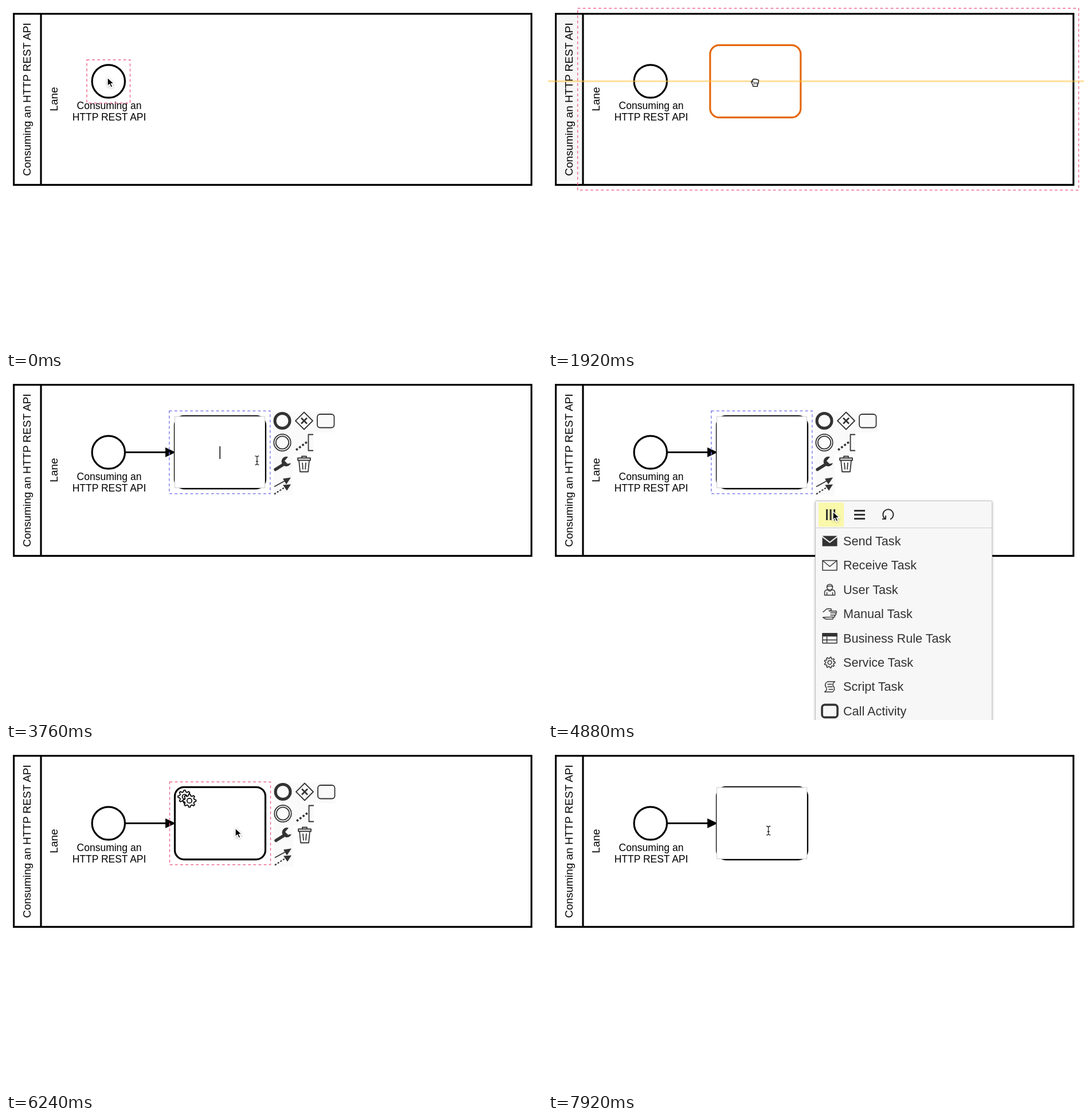
These frames come from a looping animation (935 by 599 pixels, 8 s). An HTML page:

```html
<!DOCTYPE html>
<html lang="en">
<head>
<meta charset="utf-8">
<title>Process modelling</title>
<style>
html, body { margin: 0; width: 100%; height: 100%; overflow: hidden; background: #fff; }
svg { display: block; width: 935px; height: 599px; }
text { font-family: "Liberation Sans", Arial, sans-serif; }
.ln { fill: none; stroke: #000; stroke-width: 3.2; }
.box { fill: none; stroke-width: 1.5; stroke-dasharray: 4.8 4.3; }
.hover { stroke: #ee6a8e; }
.sel { stroke: #7f7ff0; }
.ico { fill: none; stroke: #333; stroke-width: 1.8; stroke-linejoin: round; }
.solid { fill: #333; stroke: none; }
.item { fill: #333; font-size: 21.6px; }
</style>
</head>
<body>
<svg viewBox="0 0 935 599">
  <defs>
    <filter id="soft" x="-20%" y="-20%" width="140%" height="140%">
      <feDropShadow dx="0" dy="1" stdDeviation="2" flood-opacity=".3"/>
    </filter>
    <g id="pad">
      <path fill="#fafafa" d="M-16-16H92V20H54V58H18V130H-16Z"/>
      <circle class="ico" r="13" style="stroke-width:5"/>
      <g class="ico" transform="translate(38 0)">
        <path d="M0-15L15 0L0 15L-15 0Z"/>
        <path d="M-5-5L5 5M5-5L-5 5" style="stroke-width:2.6"/>
      </g>
      <rect class="ico" x="61" y="-11.5" width="29.5" height="23.5" rx="5"/>
      <g class="ico" transform="translate(0 38)">
        <circle r="14.7"/><circle r="11.2"/>
        <path d="M24 13L43-1" style="stroke-width:3.6;stroke-dasharray:3.6 3"/>
        <path d="M54-14H45.500V14H54"/>
      </g>
      <g transform="translate(0 76)">
        <path d="M-12 9L4-1" stroke="#333" stroke-width="5.5" stroke-linecap="round"/>
        <path class="solid" d="M10-13A8.500 8.500 0 1 0 15-2L9-1L4-6Z"/>
        <g class="ico" transform="translate(38 0)">
          <path d="M-9-7L-7 13H7L9-7M-3-3L-2 9M3-3L2 9"/>
          <rect x="-11" y="-11" width="22" height="4"/>
          <path d="M-4-11V-14H4V-11"/>
        </g>
      </g>
      <g transform="translate(0 114)">
        <path class="ico" d="M-14 1L6-10"/>
        <path class="ico" d="M-14 14L6 1" style="stroke-width:2.2;stroke-dasharray:3.2 2.4"/>
        <path class="solid" d="M15-15L1-13L7-3ZM15-3L1-2L8 8Z"/>
      </g>
    </g>
  </defs>

  <rect width="935" height="599" fill="#fff"/>
  <rect id="tint" x="15" y="15" width="44" height="290" fill="#f6f6f6"/>
  <path class="ln" d="M13.600 13.600H916.600V312.300H13.600ZM61 13.600V312.300"/>
  <g text-anchor="middle" font-size="19">
    <text transform="translate(43 163) rotate(-90)">Consuming an HTTP REST API</text>
    <text transform="translate(90 162.500) rotate(-90)">Lane</text>
  </g>
  <circle class="ln" cx="178.800" cy="131.500" r="28.700"/>
  <g text-anchor="middle" font-size="17.500">
    <text x="180" y="180">Consuming an</text>
    <text x="180" y="199.500">HTTP REST API</text>
  </g>

  <rect id="startBox" class="box" x="141" y="94" width="75.500" height="75.500"/>
  <rect id="laneBox" class="box hover" x="51.700" y="4" width="874" height="317.600"/>

  <g id="task">
    <path class="ln" d="M207 131.500H282"/>
    <path d="M278 123L296 131.500L278 140Z"/>
    <rect class="ln" x="294.500" y="68.300" width="158" height="126.300" rx="16" style="fill:#fff"/>
    <g id="gears" fill="#fff" stroke="#000" stroke-width="1.700"></g>
    <g id="edit">
      <rect x="294.500" y="69" width="157" height="124.500" fill="#fff" stroke="#ccc"/>
      <rect id="caret" x="372.500" y="121" width="1.500" height="22"/>
    </g>
  </g>
  <rect id="taskBox" class="box" x="285" y="59.300" width="176" height="144.500"/>

  <rect id="ghost" x="-79" y="-63.200" width="158" height="126.400" rx="16" fill="none" stroke="#e5680b" stroke-width="3.200"/>
  <rect id="snap" y="129.800" width="935" height="3.200" fill="#ffc342" opacity=".5"/>

  <use id="startPad" href="#pad" x="238" y="111.500"/>
  <use id="taskPad" href="#pad" y="76.500"/>

  <g id="menu">
    <rect x="466.500" y="216.500" width="308" height="420" rx="2" fill="#f7f7f7" stroke="#c4c4c4" filter="url(#soft)"/>
    <rect id="mark" fill="#faf8aa"/>
    <path d="M467 263.500H774" stroke="#ccc"/>
    <path d="M486.500 231V250M493 231V250M499.500 231V250M534 233.500H553M534 240.500H553M534 247.500H553" stroke="#333" stroke-width="3"/>
    <path class="ico" d="M588 247.500A9 9 0 1 1 597 248.500" style="stroke-width:2"/>
    <path class="ico" d="M583 248H589V242" style="stroke-width:2"/>
    <g id="items"></g>
  </g>

  <g id="arrow">
    <path d="M0 0V15L3.600 11.700L6.200 17.300L9 16L6.500 10.600H11.300Z" stroke="#fff" stroke-width="1.400" filter="url(#soft)"/>
  </g>
  <g id="fist" fill="#fff" stroke="#000" stroke-width="1.300" stroke-linejoin="round">
    <path d="M-3.500 7V4.500C-5 2.500-6.500 1-6.500-1Q-6-3-4-1.500V-4.500Q-3-6.500-1.300-5Q0-7 1.600-5Q3.200-6.300 4.300-4.300Q6.500-5 6.500-2.500C6.500 1 5.500 3 4.500 4.500V7Z"/>
    <path d="M-4-1.500V1M-1.500-.5V3.500M1-.5V3.500M3.500-.5V3.500" fill="none" stroke-width="1"/>
  </g>
  <path id="beam" d="M-3.500-7.500Q0-7.500 0-5Q0-7.500 3.500-7.500M0-5V5.500M-3.500 8Q0 8 0 5.500Q0 8 3.500 8M-2 2H2" fill="none" stroke="#222" stroke-width="1.300"/>
</svg>

<script>
const $ = id => document.getElementById(id);
const LOOP = 8000, STEP = 80, ROW = 42.4, ROW_TOP = 265.4;

function gear(cx, cy, r, teeth, hole) {
  let d = '';
  for (let i = 0; i < teeth * 4; i++) {
    const a = (i - .5) * Math.PI / (teeth * 2);
    const q = i % 4 < 2 ? r : r * .74;
    d += (i ? 'L' : 'M') + (cx + q * Math.cos(a)).toFixed(2) + ' ' + (cy + q * Math.sin(a)).toFixed(2);
  }
  return `<path d="${d}Z"/><circle cx="${cx}" cy="${cy}" r="${hole}"/>`;
}

const envelope = '<rect x="-12.500" y="-8.500" width="25" height="17"/>';
const items = [
  ['Send Task', '<path class="solid" d="M-13-9H13L0 1ZM-13-6.500L0 3.500L13-6.500V9H-13Z"/>'],
  ['Receive Task', envelope + '<path d="M-12.500-8.500L0 2L12.500-8.500"/>'],
  ['User Task', '<path d="M-9 9.500V4Q-8 0-4 0Q0 5 4 0Q8 0 9 4V9.500ZM-5 4.500V9M5 4.500V9"/><circle cy="-4.500" r="5"/><path d="M-5-5Q0-8 5-5"/>'],
  ['Manual Task', '<path d="M-12-3L-5-9H2Q4-7 1-5.500H-2M-1-5H11Q13-3.500 11-2H1M2-2H10Q12 0 10 2H1M2 2H8Q10 4 8 5.500H1M2 5.500H5Q7 7.500 5 9H-7L-12 6Z"/>'],
  ['Business Rule Task', envelope + '<path class="solid" d="M-13-9H13V-3H-13Z"/><path d="M-12.500 3H12.500M-5-3V8.500"/>'],
  ['Service Task', gear(0, 0, 9.500, 9, 3.3)],
  ['Script Task', '<path d="M-4-9H9Q3-5 7 0Q10 5 5 9H-9Q-3 5-7 0Q-10-5-4-9ZM-4-4.500H4M-4 0H5M-2 4.500H6"/>'],
  ['Call Activity', '<rect x="-13.500" y="-11" width="27" height="22" rx="5" style="stroke-width:3.600"/>']
];
$('items').innerHTML = items.map(([label, icon], i) => {
  const y = ROW_TOP + ROW * (i + .5);
  return `<g class="ico" style="stroke-width:1.500" transform="translate(491.500 ${y})">${icon}</g>` +
    `<text class="item" x="515" y="${y + 7.4}">${label}</text>`;
}).join('');
$('gears').innerHTML = gear(311.5, 85, 11.5, 8, 4) + gear(320, 92, 11.5, 8, 4.2);

// pointer path: time, x, y
const path = [
  [640, 177, 125], [1200, 306, 111], [1360, 306.5, 114.5], [2160, 376, 138.5], [2240, 376, 138.5],
  [2400, 373, 138.5], [3440, 373, 138.5], [4000, 480, 150], [4640, 480, 150],
  [4880, 497, 235], [5280, 556.5, 502], [5520, 557.5, 508], [5680, 557.5, 508],
  [6240, 400, 140], [6560, 384.5, 144]
];

function pointer(t) {
  const n = path.findIndex(p => p[0] > t);
  if (n === 0) return path[0].slice(1);
  if (n < 0) return path[path.length - 1].slice(1);
  const [t0, x0, y0] = path[n - 1], [t1, x1, y1] = path[n];
  const u = (t - t0) / (t1 - t0), e = u * u * (3 - 2 * u);
  return [x0 + (x1 - x0) * e, y0 + (y1 - y0) * e];
}

const show = (id, on) => $(id).style.display = on ? '' : 'none';
const move = (id, x, y) => $(id).setAttribute('transform', `translate(${x} ${y})`);
function set(id, attrs) {
  for (const k in attrs) $(id).setAttribute(k, attrs[k]);
}

function draw(t) {
  const within = (a, b) => t >= a && t < b;
  const [x, y] = pointer(t);
  const inside = (l, top, r, b) => x >= l && x <= r && y >= top && y <= b;

  // start event
  show('startBox', t < 1360);
  set('startBox', { class: 'box ' + (inside(141, 94, 217, 170) ? 'hover' : 'sel') });
  show('startPad', within(240, 1360));

  // dragging the new task
  const drag = within(1360, 3440);
  const snapped = y - 4 >= 124.5;
  show('ghost', drag);
  move('ghost', x + .8, snapped ? 131.5 : y - 4);
  show('snap', drag && snapped && t < 3040);
  show('tint', within(1440, 3440));

  // task on the canvas
  const editA = within(3440, 5760), editB = t >= 7200;
  const service = t >= 5760;
  const onTask = inside(285, 59, 461, 204);
  show('task', t >= 3440);
  show('gears', service);
  show('edit', editA || editB);
  show('caret', within(3440, 4160) || within(7200, 7920));
  show('taskBox', within(3440, 7200));
  set('taskBox', { x: service ? 285.5 : 284.8, class: 'box ' + (service && onTask ? 'hover' : 'sel') });
  show('taskPad', within(3440, 7200));
  set('taskPad', { x: service ? 483 : 482 });
  show('laneBox', within(1440, 3440) || (within(5760, 7200) && y < 318 && !onTask));

  // replace menu
  const row = Math.floor((y - ROW_TOP) / ROW);
  const onTool = inside(472, 219, 516, 262);
  show('menu', within(4480, 5760));
  show('mark', onTool || row >= 0);
  set('mark', onTool
    ? { x: 472, y: 219.5, width: 44, height: 42 }
    : { x: 467, y: ROW_TOP + row * ROW, width: 306.5, height: ROW });

  const beam = editB || (within(3440, 4000) && x < 452);
  show('fist', drag);
  show('beam', beam);
  show('arrow', !drag && !beam);
  ['fist', 'beam', 'arrow'].forEach(id => move(id, x, y));
}

const begin = performance.now();
function tick() {
  const t = (performance.now() - begin) % LOOP;
  draw(Math.floor(t / STEP) * STEP);
  requestAnimationFrame(tick);
}
tick();
</script>
</body>
</html>
```
